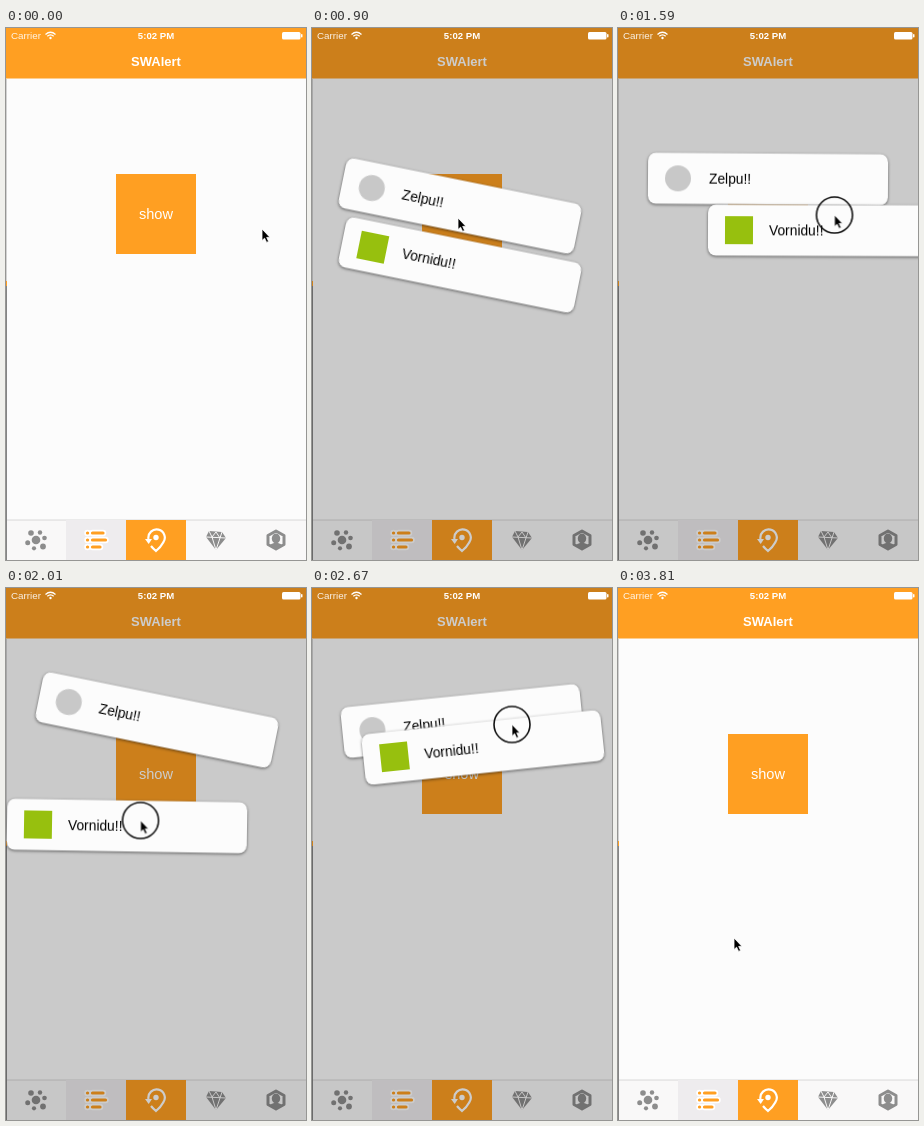
Recreate the animation shown at these times as an HTML page. Size 300 px wide and 532 px high, loop 3840 ms.

```html
<!DOCTYPE html>
<html lang="en">
<head>
<meta charset="utf-8">
<title>SWAlert</title>
<style>
  html, body { margin: 0; width: 100%; height: 100%; overflow: hidden; background: #fcfcfc; }
  svg { display: block; width: 300px; height: 532px; font-family: "Liberation Sans", Arial, sans-serif; }
  .loop { animation: 3840ms linear infinite; }
  .shade { opacity: 0; animation-name: shade; }
  .first { animation-name: first; }
  .second { animation-name: second; }
  .pointer { animation-name: pointer; }
  .touch { opacity: 0; animation-name: touch; animation-timing-function: step-end; }
  .card { filter: drop-shadow(0 1px 1.5px rgba(0, 0, 0, .55)); }

  @keyframes shade {
    0%, 15.6% { opacity: 0; }
    21.9%, 78.1% { opacity: .2; }
    81.25% { opacity: .13; }
    87.5%, 100% { opacity: 0; }
  }
  @keyframes first {
    0%, 15.6% { transform: translate(150px, -120px) rotate(4deg); animation-timing-function: ease-out; }
    23.44% { transform: translate(148px, 178px) rotate(11.5deg); animation-timing-function: ease-in-out; }
    27.34% { transform: translate(150px, 147px) rotate(-2deg); animation-timing-function: ease-in-out; }
    31.25% { transform: translate(150px, 151px) rotate(0deg); }
    41.41% { transform: translate(150px, 151px) rotate(.4deg); animation-timing-function: ease-in-out; }
    52.34% { transform: translate(151px, 132px) rotate(11.5deg); animation-timing-function: ease-in-out; }
    60% { transform: translate(150px, 145px) rotate(2deg); animation-timing-function: ease-in-out; }
    69.53% { transform: translate(150px, 133px) rotate(-5.8deg); animation-timing-function: ease-in-out; }
    75% { transform: translate(150px, 142px) rotate(2deg); animation-timing-function: ease-out; }
    81.25% { transform: translate(151px, 136px) rotate(11.2deg); animation-timing-function: ease-in; }
    91%, 100% { transform: translate(145px, 690px) rotate(40deg); }
  }
  @keyframes second {
    0%, 15.6% { transform: translate(150px, -60px) rotate(4deg); animation-timing-function: ease-out; }
    23.44% { transform: translate(148px, 237px) rotate(11.5deg); animation-timing-function: ease-in-out; }
    27.34% { transform: translate(150px, 199px) rotate(-2deg); animation-timing-function: ease-in-out; }
    31.25%, 33.6% { transform: translate(150px, 203px) rotate(0deg); animation-timing-function: ease-in-out; }
    41.41% { transform: translate(210px, 202.5px) rotate(.2deg); animation-timing-function: ease-in-out; }
    52.34% { transform: translate(121px, 238px) rotate(.9deg); animation-timing-function: ease-in-out; }
    69.53% { transform: translate(171px, 159.5px) rotate(-6deg); animation-timing-function: ease-in-out; }
    75% { transform: translate(150px, 205px) rotate(2deg); animation-timing-function: ease-in; }
    81.25% { transform: translate(126px, 315px) rotate(19.5deg); }
    88%, 100% { transform: translate(105px, 680px) rotate(48deg); }
  }
  @keyframes pointer {
    0% { transform: translate(256px, 201px); animation-timing-function: ease-in-out; }
    10.94%, 33.6% { transform: translate(146px, 190px); animation-timing-function: ease-in-out; }
    41.41% { transform: translate(216.5px, 187px); animation-timing-function: ease-in-out; }
    52.34% { transform: translate(134.5px, 232.5px); animation-timing-function: ease-in-out; }
    69.53%, 71% { transform: translate(200px, 136.5px); animation-timing-function: ease-in-out; }
    77.34%, 100% { transform: translate(116px, 350px); }
  }
  @keyframes touch {
    0%, 14.06%, 71.88%, 79.5%, 100% { opacity: 0; }
    11.72%, 32.8%, 77.6% { opacity: 1; }
  }
</style>
</head>
<body>
<svg viewBox="0 0 300 532">
  <rect width="300" height="532" fill="#fcfcfc"/>

  <g fill="#ff9f22">
    <rect width="300" height="50.5"/>
    <rect x="110" y="146" width="80" height="80"/>
  </g>
  <g fill="#fff" text-anchor="middle">
    <text x="150" y="38" font-size="13" font-weight="700">SWAlert</text>
    <text x="150" y="191" font-size="14.6">show</text>
  </g>

  <!-- tab bar -->
  <rect y="492" width="300" height="40" fill="#f9f8f8"/>
  <path d="M0 492H300" stroke="#d8d8d8"/>
  <rect x="60" y="492" width="60" height="40" fill="#eeecee"/>
  <rect x="120" y="492" width="60" height="40" fill="#ff9f22"/>

  <g transform="translate(30 512)" fill="#8d8d8d">
    <circle r="4.3"/>
    <circle cx="-5" cy="-7" r="2.8"/>
    <circle cx="4" cy="-7.5" r="2.2"/>
    <circle cx="8.5" cy="-2" r="2.3"/>
    <circle cx="7" cy="6.5" r="2.9"/>
    <circle cx="-2" cy="8.3" r="2.1"/>
    <circle cx="-8.3" cy="2.8" r="2.5"/>
  </g>

  <g transform="translate(90 512)" fill="none" stroke-linecap="round">
    <path id="list" d="M-8.5 -7h.1M-3.5 -7H7M-8.5 0h.1M-3.5 0H9.5M-8.5 7h.1M-3.5 7H4" stroke="#fff" stroke-width="6.5"/>
    <path d="M-8.5 -7h.1M-3.5 -7H7M-8.5 0h.1M-3.5 0H9.5M-8.5 7h.1M-3.5 7H4" stroke="#ff9f22" stroke-width="3.2"/>
  </g>

  <g transform="translate(150 512)" fill="none" stroke="#fff" stroke-width="2.2">
    <path d="M-7.5 -1A8.2 8.2 0 1 1 7.2 2.5Q4.5 7.5 0 11Q-3 8.5 -5 6"/>
    <circle cy="-2.5" r="2.7" fill="#fff" stroke="none"/>
    <path d="M-11 -1H-4L-7.3 4Z" fill="#fff" stroke="none"/>
  </g>

  <g transform="translate(210 512)">
    <path d="M-7 -9L6 -8L10 -2L0 10L-10 -3Z" fill="#8d8d8d"/>
    <path d="M-10 -3L10 -2M-4 -3L0 10L4 -2M-7 -9L-4 -3L0 -8L4 -2L6 -8" fill="none" stroke="#f9f8f8"/>
  </g>

  <g transform="translate(270 512)" fill="#8d8d8d">
    <path d="M0 -9L8 -4.5V4.5L0 9L-8 4.5V-4.5Z" fill="none" stroke="#8d8d8d" stroke-width="3" stroke-linejoin="round"/>
    <ellipse cy="-1.5" rx="4.2" ry="5"/>
    <path d="M-6.5 6Q-5 3.5 -2 3H2Q5 3.5 6.5 6L0 9Z"/>
  </g>

  <!-- window edge -->
  <path d="M.5 51V253" stroke="#d2d2d2"/>
  <path d="M.5 253V258" stroke="#ff9f22"/>
  <path d="M.5 258V532" stroke="#858585"/>

  <rect class="loop shade" width="300" height="532"/>

  <!-- status bar -->
  <g fill="#fff">
    <text x="5" y="11.3" font-size="9.8" opacity=".9">Carrier</text>
    <text x="150" y="11.3" font-size="9.6" font-weight="700" text-anchor="middle">5:02 PM</text>
    <path d="M39.5 6.4Q44.5 2 49.5 6.4M41.3 8.3Q44.5 5.5 47.7 8.3" fill="none" stroke="#fff" stroke-width="1.3"/>
    <circle cx="44.5" cy="10" r="1.2"/>
    <rect x="276" y="4" width="18.5" height="7.5" rx="1.5"/>
    <rect x="295" y="6" width="1.5" height="3.5" rx=".7"/>
  </g>

  <g class="loop first">
    <g class="card">
      <rect x="-120" y="-25.5" width="240" height="51" rx="8" fill="#fcfcfc"/>
      <circle cx="-90" r="13" fill="#c8c8c8"/>
      <text x="-59" y="5" font-size="13.8">Zelpu!!</text>
    </g>
  </g>
  <g class="loop second">
    <g class="card">
      <rect x="-120" y="-25.5" width="240" height="51" rx="8" fill="#fcfcfc"/>
      <rect x="-103" y="-14" width="28" height="28" fill="#97c00e"/>
      <text x="-59" y="5" font-size="13.8">Vornidu!!</text>
    </g>
  </g>

  <g class="loop pointer">
    <circle class="loop touch" r="18" fill="none" stroke="#111" stroke-width="1.6"/>
    <path d="M0 0V11.5L2.6 9.2L4.6 13.4L6.6 12.4L4.7 8.4H8Z" fill="#000" stroke="#fff" stroke-width=".8"/>
  </g>
</svg>
</body>
</html>
```
